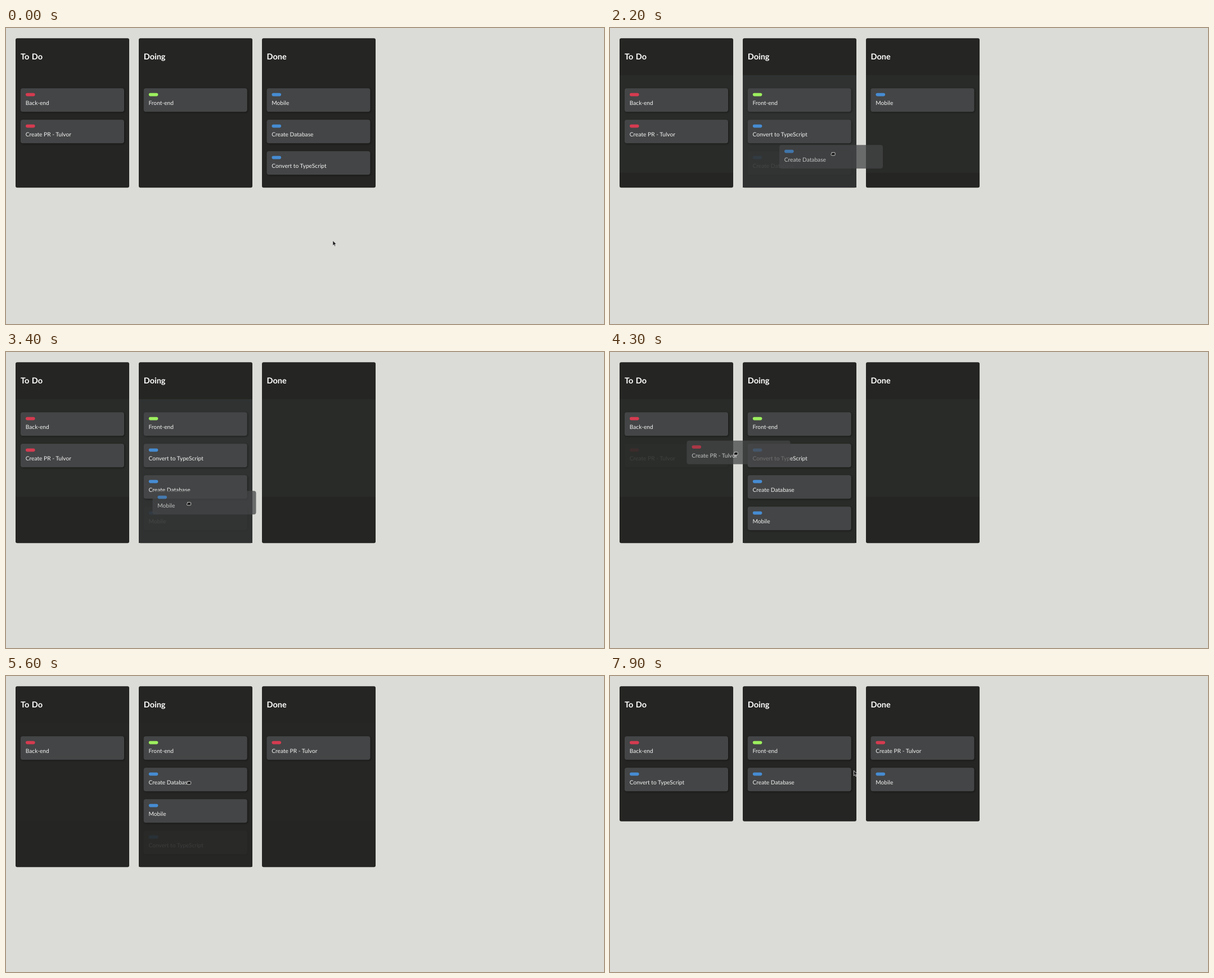
Write an HTML page that moves like this. It is 1063 by 527 pixels and loops after 8000 ms.

```html
<!DOCTYPE html>
<html lang="en">
<head>
<meta charset="utf-8">
<title>Kanban board</title>
<style>
  html, body { margin: 0; width: 100%; height: 100%; overflow: hidden; background: #dbdcd7; }
  svg { display: block; width: 100%; height: 100%; }
  text { font: 10.2px Lato, "Open Sans", sans-serif; fill: #f3f3f3; text-rendering: geometricPrecision; }
  .title { font-size: 14.5px; font-weight: 700; fill: #fff; word-spacing: .07em; }
  .column { fill: #252523; }
  .card .face { fill: #444546; }
  .card.resting .face { filter: drop-shadow(1px 1.5px 1.5px rgba(0, 0, 0, .45)); }
</style>
</head>
<body>
<svg viewBox="0 0 1063 527"></svg>
<script>
const LOOP = 8000, STEP = 100, FADE = 200;
const LEFT = 17, TOP = 18.3, LIST_TOP = 84, WIDTH = 202, PITCH = 218.75, ROW = 56;
const RED = '#d53b50', GREEN = '#9cef5e', BLUE = '#468cd2';

const titles = ['To Do', 'Doing', 'Done'];
const cards = [
  ['Back-end', RED], ['Create PR - Tulvor', RED], ['Front-end', GREEN],
  ['Mobile', BLUE], ['Create Database', BLUE], ['Convert to TypeScript', BLUE]
];
const startLists = [[0, 1], [2], [3, 4, 5]];

// each drag picks a card up at one point and lets it go at another
const drags = [
  { card: 5, start: 800, drop: 1000, grab: [538, 248], release: [373.5, 245] },
  { card: 4, start: 1900, drop: 2300, grab: [555, 176], release: [392.5, 221] },
  { card: 3, start: 3000, drop: 3500, grab: [524, 127], release: [321, 267] },
  { card: 1, start: 4200, drop: 4700, grab: [109, 183], release: [551, 161] },
  { card: 5, start: 5600, drop: 5900, grab: [321, 187], release: [140, 187] },
  { card: 3, start: 6500, drop: 7000, grab: [330, 238], release: [566, 192] }
];

// the pointer rests briefly at each grab and release and travels in between
const path = [
  [0, 580.5, 378],
  ...drags.flatMap(({ start, drop, grab, release }) => [
    [start - STEP, ...grab], [start, ...grab],
    [drop - STEP, ...release], [drop + STEP, ...release]
  ]),
  [7200, 564, 165], [7600, 564, 165], [7900, 433, 168]
];

function pointer(t) {
  const i = path.findIndex(key => key[0] > t);
  if (i < 0) return path.at(-1).slice(1);
  const [t0, x0, y0] = path[i - 1], [t1, x1, y1] = path[i];
  const k = (t - t0) / (t1 - t0);
  return [x0 + (x1 - x0) * k, y0 + (y1 - y0) * k];
}

const svg = document.querySelector('svg');
function set(el, attrs) {
  for (const key in attrs) el.setAttribute(key, attrs[key]);
}
function add(parent, tag, attrs, text) {
  const el = document.createElementNS('http://www.w3.org/2000/svg', tag);
  set(el, attrs);
  if (text) el.textContent = text;
  parent.append(el);
  return el;
}
const moveTo = (el, x, y) => set(el, { transform: `translate(${x} ${y})` });
const clamp = v => Math.max(0, Math.min(1, v));
const columnX = c => Math.round(LEFT + c * PITCH);
const columnAt = x => Math.floor((x - LEFT) / PITCH);
const innerX = c => LEFT + 9 + c * PITCH;
const slot = (c, row) => [innerX(c), 107.2 + row * ROW];
const listBottom = n => Math.max(258.7, 116.3 + n * ROW);

const columns = titles.map((title, c) => {
  const x = columnX(c);
  const body = add(svg, 'rect', { class: 'column', x, y: TOP, width: WIDTH, rx: 3 });
  const tint = fill => add(svg, 'rect', { x, y: LIST_TOP, width: WIDTH, fill });
  const active = tint('#292b28'), over = tint('#303232');
  add(svg, 'text', { class: 'title', x: innerX(c), y: 56.2 }, title);
  return { body, active, over };
});

function makeCard([label, color], kind) {
  const g = add(svg, 'g', { class: `card ${kind}` });
  add(g, 'rect', { class: 'face', width: 184, height: 42, rx: 4 });
  add(g, 'rect', { x: 9, y: 8.6, width: 16.6, height: 5.6, rx: 2.8, fill: color });
  add(g, 'text', { x: 8.8, y: 30 }, label);
  return g;
}
const cardEls = cards.map(card => makeCard(card, 'resting'));
const ghosts = cards.map(card => makeCard(card, 'ghost'));

const cursor = d => add(svg, 'path', {
  d, fill: '#1b1b1b', stroke: '#eee', 'stroke-width': .8, 'stroke-linejoin': 'round'
});
const arrow = cursor('M.4 .4V9.6L2.5 7.7L3.9 10.9L5.5 10.2L4.1 7.1H6.9Z');
const hand = cursor('M1.6 .7H6.6Q7.6 .7 7.6 1.8V4.6Q7.6 5.9 6.4 5.9H2Q.5 5.9 .5 4.4V3.3L1.6 2.5Z');

// replays every drag up to t; a dragged card joins the end of the list under the pointer
function boardAt(t) {
  const lists = startLists.map(list => [...list]);
  const over = [0, 0, 0];
  let active = 0, current = null;
  for (const drag of drags.filter(d => d.start <= t)) {
    const { card, start, drop } = drag;
    const origin = lists.findIndex(list => list.includes(card));
    const home = slot(origin, lists[origin].indexOf(card));
    let at = origin;
    for (let s = start; s <= Math.min(t, drop - STEP); s += STEP) {
      const next = columnAt(pointer(s)[0]);
      if (s > start && next === at) continue;
      lists[at].splice(lists[at].indexOf(card), 1);
      lists[next].push(card);
      at = next;
    }
    const fade = 1 - clamp((t - drop) / FADE);
    active = Math.max(active, Math.min(fade, (t - start + STEP) / FADE));
    if (at !== origin) over[at] = Math.max(over[at], fade);
    if (t < drop) current = { ...drag, home };
  }
  return { lists, over, active, current };
}

function render(t) {
  const { lists, over, active, current } = boardAt(t);
  const [px, py] = pointer(t);
  const bottom = listBottom(Math.max(...lists.map(list => list.length)));

  columns.forEach((col, c) => {
    const height = Math.floor(listBottom(lists[c].length)) - LIST_TOP;
    set(col.body, { height: bottom - TOP });
    set(col.active, { height, opacity: active });
    set(col.over, { height, opacity: over[c] });
    lists[c].forEach((id, row) => {
      moveTo(cardEls[id], ...slot(c, row));
      set(cardEls[id], { opacity: current?.card === id ? .1 : 1 });
    });
  });

  ghosts.forEach((ghost, id) => {
    const shown = current?.card === id && t > current.start;
    set(ghost, { opacity: shown ? .75 : 0 });
    if (!shown) return;
    const { home, grab } = current;
    moveTo(ghost, home[0] + px - grab[0], home[1] + py - grab[1]);
  });

  set(arrow, { opacity: current ? 0 : 1 });
  set(hand, { opacity: current ? 1 : 0 });
  moveTo(arrow, px, py);
  moveTo(hand, px, py);
}

let begin;
function tick(now) {
  begin ??= now;
  render(Math.floor((now - begin) % LOOP / STEP) * STEP);
  requestAnimationFrame(tick);
}
render(0);
requestAnimationFrame(tick);
</script>
</body>
</html>
```
